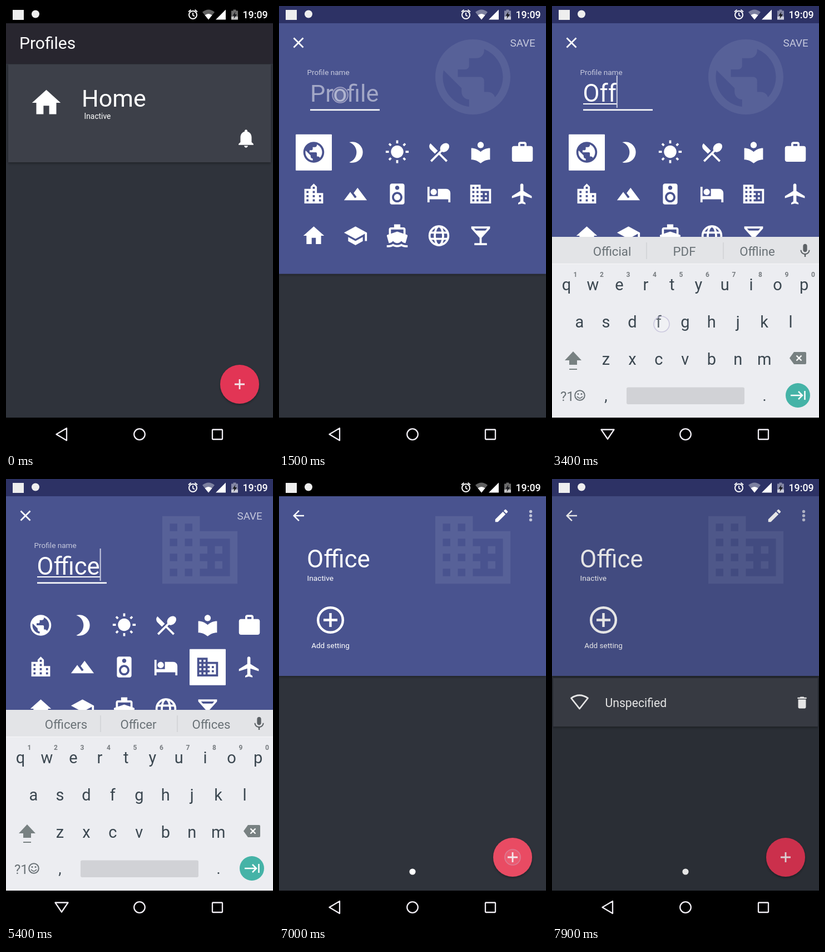
An HTML page that plays this animation: 480 by 800 pixels, repeating every 8000 ms.

```html
<!DOCTYPE html>
<html lang="en">
<head>
<meta charset="utf-8">
<title>Profiles</title>
<style>
html, body { margin: 0; width: 100%; height: 100%; overflow: hidden; background: #000; }
svg { display: block; width: 480px; height: 800px; font-family: Roboto, "Noto Sans", sans-serif; }
</style>
</head>
<body>
<svg id="stage" viewBox="0 0 480 800"></svg>
<script>
const LOOP = 8000, STEP = 100;
const BLUE = '#4a538f', BODY = '#2f333b', INK = '#3b4750', GREY = '#697176';

// Icon outlines on a 24-unit grid
const ICONS = {
  earth: 'M12 2C6.48 2 2 6.48 2 12s4.48 10 10 10 10-4.48 10-10S17.52 2 12 2zm-1 17.93c-3.95-.49-7-3.85-7-7.93 0-.62.08-1.21.21-1.79L9 15v1c0 1.1.9 2 2 2v1.93zm6.9-2.54c-.26-.81-1-1.39-1.9-1.39h-1v-3c0-.55-.45-1-1-1H8v-2h2c.55 0 1-.45 1-1V7h2c1.1 0 2-.9 2-2v-.41c2.93 1.19 5 4.06 5 7.41 0 2.08-.8 3.97-2.1 5.39z',
  moon: 'M9 2c-1.05 0-2.05.16-3 .46 4.06 1.27 7 5.06 7 9.54 0 4.48-2.94 8.27-7 9.54.95.3 1.95.46 3 .46 5.52 0 10-4.48 10-10S14.52 2 9 2z',
  sun: 'M6.76 4.84l-1.8-1.79-1.41 1.41 1.79 1.79 1.42-1.41zM4 10.5H1v2h3v-2zm9-9.95h-2V3.5h2V.55zm7.45 3.91l-1.41-1.41-1.79 1.79 1.41 1.41 1.79-1.79zm-3.21 13.7l1.79 1.8 1.41-1.41-1.8-1.79-1.4 1.4zM20 10.5v2h3v-2h-3zm-8-5c-3.31 0-6 2.69-6 6s2.69 6 6 6 6-2.69 6-6-2.69-6-6-6zm-1 16.95h2V19.5h-2v2.95zm-7.45-3.91l1.41 1.41 1.79-1.8-1.41-1.41-1.79 1.8z',
  food: 'M8.1 13.34l2.83-2.83L3.91 3.5c-1.56 1.56-1.56 4.09 0 5.66l4.19 4.18zm6.78-1.81c1.53.71 3.68.21 5.27-1.38 1.91-1.91 2.28-4.65.81-6.12-1.46-1.46-4.2-1.1-6.12.81-1.59 1.59-2.09 3.74-1.38 5.27L3.7 19.87l1.41 1.41L12 14.41l6.88 6.88 1.41-1.41L13.41 13l1.47-1.47z',
  book: 'M12 11.55C9.64 9.35 6.48 8 3 8v11c3.48 0 6.64 1.35 9 3.55 2.36-2.19 5.52-3.55 9-3.55V8c-3.48 0-6.64 1.35-9 3.55zM12 8c1.66 0 3-1.34 3-3s-1.34-3-3-3-3 1.34-3 3 1.34 3 3 3z',
  bag: 'M20 6h-4V4c0-1.11-.89-2-2-2h-4c-1.11 0-2 .89-2 2v2H4c-1.11 0-1.99.89-1.99 2L2 19c0 1.11.89 2 2 2h16c1.11 0 2-.89 2-2V8c0-1.11-.89-2-2-2zm-6 0h-4V4h4v2z',
  city: 'M15 11V5l-3-3-3 3v2H3v14h18V11h-6zm-8 8H5v-2h2v2zm0-4H5v-2h2v2zm0-4H5V9h2v2zm6 8h-2v-2h2v2zm0-4h-2v-2h2v2zm0-4h-2V9h2v2zm0-4h-2V5h2v2zm6 12h-2v-2h2v2zm0-4h-2v-2h2v2z',
  hills: 'M14 6l-3.75 5 2.85 3.8-1.6 1.2C9.81 13.75 7 10 7 10l-6 8h22L14 6z',
  speaker: 'M17 2H7c-1.1 0-2 .9-2 2v16c0 1.1.9 2 2 2h10c1.1 0 2-.9 2-2V4c0-1.1-.9-2-2-2zm-5 2c1.1 0 2 .9 2 2s-.9 2-2 2-2-.9-2-2 .9-2 2-2zm0 16c-2.76 0-5-2.24-5-5s2.24-5 5-5 5 2.24 5 5-2.24 5-5 5zm0-8c-1.66 0-3 1.34-3 3s1.34 3 3 3 3-1.34 3-3-1.34-3-3-3z',
  bed: 'M7 13c1.66 0 3-1.34 3-3S8.66 7 7 7s-3 1.34-3 3 1.34 3 3 3zm12-6h-8v7H3V5H1v15h2v-3h18v3h2v-9c0-2.21-1.79-4-4-4z',
  office: 'M12 7V3H2v18h20V7H12zM6 19H4v-2h2v2zm0-4H4v-2h2v2zm0-4H4V9h2v2zm0-4H4V5h2v2zm4 12H8v-2h2v2zm0-4H8v-2h2v2zm0-4H8V9h2v2zm0-4H8V5h2v2zm10 12h-8v-2h2v-2h-2v-2h2v-2h-2V9h8v10zm-2-8h-2v2h2v-2zm0 4h-2v2h2v-2z',
  plane: 'M21 16v-2l-8-5V3.5c0-.83-.67-1.5-1.5-1.5S10 2.67 10 3.5V9l-8 5v2l8-2.5V19l-2 1.5V22l3.5-1 3.5 1v-1.5L13 19v-5.5l8 2.5z',
  home: 'M10 20v-6h4v6h5v-8h3L12 3 2 12h3v8z',
  school: 'M5 13.18v4L12 21l7-3.82v-4L12 17l-7-3.82zM12 3L1 9l11 6 9-4.91V17h2V9L12 3z',
  boat: 'M20 21c-1.39 0-2.78-.47-4-1.32-2.44 1.71-5.56 1.71-8 0C6.78 20.53 5.39 21 4 21H2v2h2c1.38 0 2.74-.35 4-1 2.52 1.3 5.48 1.3 8 0 1.26.65 2.62 1 4 1h2v-2h-2zM4 19c1.6 0 3-.88 4-2 1 1.12 2.4 2 4 2s3-.88 4-2c1 1.12 2.4 2 4 2l1.9-6.7c.2-.6-.1-1.1-.6-1.3L20 10.6V6c0-1.1-.9-2-2-2h-3V1H9v3H6c-1.1 0-2 .9-2 2v4.6l-1.3.4c-.5.2-.8.7-.6 1.3L4 19zM6 6h12v4L12 8 6 10V6z',
  globe: '',
  bar: 'M21 5V3H3v2l8 9v5H6v2h12v-2h-5v-5l8-9zM7.43 7L5.66 5h12.69l-1.78 2H7.43z',
  bell: 'M12 22c1.1 0 2-.9 2-2h-4c0 1.1.89 2 2 2zm6-6v-5c0-3.07-1.64-5.64-4.5-6.32V4c0-.83-.67-1.5-1.5-1.5s-1.5.67-1.5 1.5v.68C7.63 5.36 6 7.92 6 11v5l-2 2v1h16v-1l-2-2z',
  back: 'M20 11H7.83l5.59-5.59L12 4l-8 8 8 8 1.41-1.41L7.83 13H20v-2z',
  pencil: 'M3 17.25V21h3.75L17.81 9.94l-3.75-3.75L3 17.25zM20.71 7.04c.39-.39.39-1.02 0-1.41l-2.34-2.34c-.39-.39-1.02-.39-1.41 0l-1.83 1.83 3.75 3.75 1.83-1.83z',
  bin: 'M6 19c0 1.1.9 2 2 2h8c1.1 0 2-.9 2-2V7H6v12zM19 4h-3.5l-1-1h-5l-1 1H5v2h14V4z',
  mic: 'M12 14c1.66 0 3-1.34 3-3V5c0-1.66-1.34-3-3-3S9 3.34 9 5v6c0 1.66 1.34 3 3 3zm5.3-3c0 3-2.54 5.1-5.3 5.1S6.7 14 6.7 11H5c0 3.41 2.72 6.23 6 6.72V21h2v-3.28c3.28-.48 6-3.3 6-6.72h-1.7z'
};
const GRID = Object.keys(ICONS).slice(0, 17);

const icon = (name, x, y, scale, fill = '#fff', extra = '') => {
  const shape = name === 'globe'
    ? `<g fill="none" stroke="${fill}" stroke-width="2"><circle cx="12" cy="12" r="9"/><ellipse cx="12" cy="12" rx="4" ry="9"/><path d="M4 9h16M4 15h16"/></g>`
    : `<path d="${ICONS[name]}" fill="${fill}"/>`;
  return `<g transform="translate(${x} ${y}) scale(${scale}) translate(-12 -12)" ${extra}>${shape}</g>`;
};
const rect = (x, y, w, h, fill, extra = '') =>
  `<rect x="${x}" y="${y}" width="${w}" height="${h}" fill="${fill}" ${extra}/>`;
const circle = (x, y, r, fill, extra = '') => `<circle cx="${x}" cy="${y}" r="${r}" fill="${fill}" ${extra}/>`;
const text = (x, y, size, str, fill = '#fff', extra = '') =>
  `<text x="${x}" y="${y}" font-size="${size}" fill="${fill}" ${extra}>${str}</text>`;
const line = (d, stroke, width, extra = '') =>
  `<path d="${d}" fill="none" stroke="${stroke}" stroke-width="${width}" ${extra}/>`;
const middle = 'text-anchor="middle"';
const shadow = 'filter="url(#shadow)"';

const fab = id => circle(420, 680, 35, '#e23655', `id="${id}" ${shadow}`) +
  line('M411 680h18M420 671v18', '#f3e6ea', 2.8);
const wifiFan = (x, y, stroke) => line(`M${x - 15} ${y - 8}q15 -10.5 30 0l-15 19z`, stroke, 2.8, 'stroke-linejoin="round"');

const listScreen = rect(0, 31, 480, 709, BODY) + rect(0, 31, 480, 73, '#28262f') +
  text(24, 77, 30, 'Profiles') + rect(4, 105, 472, 176, '#3c404a', shadow) +
  icon('home', 72.5, 174, 2.57) + text(136, 181, 43, 'Home') + text(140.5, 203, 13.8, 'Inactive') +
  icon('bell', 431.5, 238, 1.67) + fab('listFab');

const cell = i => [62.5 + 75 * (i % 6), 263 + 75 * Math.floor(i / 6)];
const editorScreen = rect(0, 31, 480, 709, BODY) + rect(0, 31, 480, 450.5, BLUE, shadow) +
  line('M26.5 57.5l17 17M43.5 57.5l-17 17', '#fff', 2.8) + text(415.5, 73, 18.8, 'SAVE', '#c6c9dd') +
  icon('earth', 348.5, 127.5, 6.75, '#fff', 'id="bigEarth" opacity=".08"') +
  icon('office', 348.5, 127.5, 6.75, '#fff', 'id="bigOffice" opacity=".08"') +
  text(50.5, 124, 13.6, 'Profile name', '#c6c9dd') + text(56, 172, 43.2, 'Profile', '#a3a8c7', 'id="hint"') +
  text(55.5, 172, 43.6, '', '#fff', 'id="typed"') +
  rect(56, 185.5, 125, 2.6, '#fff') + rect(56, 175, 0, 2, '#fff', 'id="composing"') +
  rect(56, 125, 2, 58, '#c9cce0', 'id="caret"') +
  rect(0, 0, 65, 65, '#fff', 'id="picked" rx="1"') +
  GRID.map((name, i) => `<g id="cell${i}">${icon(name, ...cell(i), 1.875, 'currentColor')}</g>`).join('');

const keyRow = (letters, x, y) => [...letters].map((c, i) =>
  text(x + 47.45 * i, y, 29, c, INK, `${middle} class="key"`)).join('');
const keyboard = rect(0, 415, 480, 325, '#ecedf1') + rect(0, 415, 480, 48, '#e3e4e7') +
  line('M0 463.5h480', '#f6f6f8', 1) + line('M170 425v30M308 425v30', '#c6c8cb', 1) +
  [108, 238, 369].map((x, i) => text(x, 448.5, 22.2, '', GREY, `${middle} id="word${i}"`)).join('') +
  icon('mic', 455, 440, 1.22, '#5d6266') +
  keyRow('qwertyuiop', 26, 511) + keyRow('asdfghjkl', 49.5, 578) + keyRow('zxcvbnm', 97, 645) +
  [...'1234567890'].map((n, i) => text(42 + 47.5 * i, 486.5, 12, n, '#777c80', `${middle} font-weight="700"`)).join('') +
  '<path d="M38 621l15 16h-8v8h-14v-8h-8z" fill="#788182"/>' + line('M31 653h14', '#788182', 2) +
  '<path d="M427 633l8-11h20q2 0 2 2v18q0 2-2 2h-20z" fill="#788182"/>' + line('M439.500 628.500l9 9M448.500 628.500l-9 9', '#fff', 2.4) +
  text(15, 710, 24, '?1', GREY) + circle(50, 700, 8.8, 'none', `stroke="${GREY}" stroke-width="2"`) +
  circle(47, 697.500, 1.5, GREY) + circle(53, 697.500, 1.5, GREY) + line('M45 702q5 6 10 0', GREY, 1.8) +
  text(97, 710, 27, ',', INK, middle) + text(382, 710, 27, '.', INK, middle) +
  rect(134, 685.5, 212, 30.5, '#d1d2d6', 'rx="3"') + circle(442, 700, 22, '#45b3a7') +
  line('M429 700h20M443 693l7 7-7 7M454.500 692v16', '#fff', 2.5);

const detailScreen = rect(0, 31, 480, 709, BODY) + rect(0, 31, 480, 323, BLUE, shadow) +
  icon('back', 35, 66, 1.25) + icon('pencil', 400, 66, 1.25) +
  [58.5, 66, 73.5].map(y => circle(452.5, y, 2.7, '#c0c3d8')).join('') +
  icon('office', 348.5, 127.5, 6.75, '#fff', 'opacity=".08"') +
  text(50, 159, 43.8, 'Office') + text(50.5, 183, 13.7, 'Inactive') +
  circle(92.5, 253.5, 22.3, 'none', 'stroke="#fff" stroke-width="4.4"') +
  line('M80 253.500h25M92.500 241v25', '#fff', 4.4) + text(92.5, 304, 13.5, 'Add setting', '#fff', middle) +
  `<g id="condition">${rect(2, 358, 476, 87, '#3c4049', shadow)}${wifiFan(49.5, 402, '#fff')}` +
  text(95.5, 410, 21.2, 'Unspecified') + icon('bin', 449.5, 402, 1.16) + '</g>' +
  circle(240, 706, 5.6, '#fff') + fab('detailFab');

const sheet = rect(0, 496, 480, 244, '#fff') + text(22.5, 541, 21, 'Add condition', '#3d3d42') +
  circle(46, 606, 13.6, 'none', 'stroke="#3b3b42" stroke-width="2.8"') + line('M46 598v9l6 4', '#3b3b42', 2.4) +
  text(103.5, 614.5, 22.5, 'Time / day of week', '#3d3d42') +
  wifiFan(46.5, 681, '#3b3b42') + text(103, 690, 22.5, 'Connecting to Wi-Fi', '#3d3d42');

const statusBar = rect(0, 0, 480, 31, '#000') + rect(0, 0, 480, 31, '#2d3265', 'id="statusTint"') +
  rect(12, 7, 20, 18, '#eee') + circle(53, 14.5, 7, '#eee') +
  circle(336, 16, 7, 'none', 'stroke="#fff" stroke-width="2"') +
  line('M336 12v4.500l3 2M328 10.500l4.500-3.700M344 10.500l-4.500-3.700', '#fff', 1.8) +
  '<path d="M353 11q11-9 22 0l-11 13.500z" fill="#fff" opacity=".38"/><path d="M357.500 16.500q6.500-5 13 0l-6.500 8z" fill="#fff"/>' +
  '<path d="M377 24.500h18V6.500z" fill="#fff"/>' +
  '<path d="M405 8.500h3.500V6.500h5v2h3.500v16h-12z" fill="#fff" opacity=".42"/><path d="M405 19h12v5.500h-12z" fill="#fff" opacity=".6"/><path d="M412.500 10l-5 7.500h3l-1 5.500 5.500-8h-3.500z" fill="#16171c"/>' +
  text(425.5, 22, 17.8, '19:09', '#fff', 'font-weight="500"');

const navBar = rect(0, 740, 480, 60, '#000') +
  line('', '#f1eef4', 2.3, 'id="backKey" stroke-linejoin="round"') +
  circle(240, 770, 9.8, 'none', 'stroke="#f1eef4" stroke-width="2.3"') +
  rect(371, 761.5, 18, 17.5, 'none', 'stroke="#f1eef4" stroke-width="2.3" rx="1"');

const group = (id, body) => `<g id="${id}">${body}</g>`;
const stage = document.getElementById('stage');
stage.innerHTML = '<defs><filter id="shadow" x="-20%" y="-20%" width="140%" height="150%">' +
  '<feDropShadow dx="0" dy="2" stdDeviation="2" flood-opacity=".35"/></filter></defs>' +
  group('list', listScreen) + group('editor', editorScreen) + group('detail', detailScreen) +
  group('keyboard', keyboard) + rect(0, 31, 480, 709, '#000', 'id="dim"') + group('sheet', sheet) +
  statusBar + navBar + circle(0, 0, 14, '#fff', 'id="touch" fill-opacity=".22" stroke="#c8c4dc" stroke-width="1.6"');

const $ = id => document.getElementById(id);
const set = (id, attrs) => { for (const k in attrs) $(id).setAttribute(k, attrs[k]); };
const show = (id, on) => set(id, { display: on ? 'inline' : 'none' });
const clamp = v => Math.max(0, Math.min(1, v));
const ramp = (t, from, to) => clamp((t - from) / (to - from));
const easeOut = v => 1 - (1 - v) ** 2.5;

// Time, text and the suggestions that follow it
const TYPING = [
  [0, '', '', '', ''],
  [2600, 'O', 'Of', 'On', 'Our'],
  [3200, 'Of', 'Of', 'Off', 'Offer'],
  [3400, 'Off', 'Official', 'PDF', 'Offline'],
  [3700, 'Offi', 'Official', 'Office', 'Officer'],
  [4100, 'Offic', 'Officer', 'Office', 'Official'],
  [4400, 'Office', 'Officers', 'Officer', 'Offices']
];
// Time, position of each tap
const TAPS = [
  [500, 420, 680], [1500, 110, 160], [2500, 405, 502], [3100, 192, 570], [3300, 197, 572],
  [3600, 358, 502], [4000, 192, 635], [4300, 121, 502], [4900, 362, 338],
  [5600, 438, 66], [6800, 420, 680], [7600, 250, 700]
];
const keys = [...document.querySelectorAll('.key')];
const letters = keys.map(k => k.textContent);

function enter(id, t, from, to) {
  const p = easeOut(ramp(t, from, to));
  show(id, p > 0);
  set(id, { opacity: p, transform: `translate(0 ${64 * (1 - p)})` });
  return p;
}

function draw(t) {
  const editorIn = enter('editor', t, 800, 1200);
  enter('detail', t, 5900, 6300);
  show('list', editorIn < 1);

  const [since, typed, ...words] = TYPING.filter(s => s[0] <= t).pop();
  $('typed').textContent = typed;
  words.forEach((w, i) => $('word' + i).textContent = w);
  show('hint', !typed);
  const width = typed ? $('typed').getComputedTextLength() : 0;
  set('composing', { width });
  set('caret', { x: 55.5 + width });
  const blinkStart = since || (t < 1600 ? 1000 : 1600);
  show('caret', t >= 1000 && Math.floor((t - blinkStart) / 500) % 2 === 0);
  keys.forEach((k, i) => k.textContent = typed ? letters[i] : letters[i].toUpperCase());

  const choice = t < 5000 ? 0 : GRID.indexOf('office');
  const [cx, cy] = cell(choice);
  set('picked', { x: cx - 32.5, y: cy - 32.3 });
  GRID.forEach((_, i) => set('cell' + i, { color: i === choice ? BLUE : '#fff' }));
  show('bigEarth', choice === 0);
  show('bigOffice', choice !== 0);

  const up = easeOut(ramp(t, 1600, 2000)) * (1 - ramp(t, 5700, 6000));
  show('keyboard', up > 0);
  set('keyboard', { opacity: up, transform: `translate(0 ${325 * (1 - up)})` });
  set('backKey', { d: up > 0.5 ? 'M88.500 761.500h23l-11.500 17z' : 'M90.500 770l18.500-11v22z' });

  const dim = 0.6 * easeOut(ramp(t, 7000, 7400)) * (1 - ramp(t, 7720, 7936));
  set('dim', { opacity: dim });
  const sheetUp = easeOut(ramp(t, 7000, 7400)) * (1 - ramp(t, 7700, 7900));
  show('sheet', sheetUp > 0);
  set('sheet', { transform: `translate(0 ${244 * (1 - sheetUp)})` });
  show('condition', t >= 7800);
  set('statusTint', { opacity: t >= 6900 && t < 7800 ? 0 : editorIn });

  set('listFab', { fill: t >= 600 && t < 900 ? '#e94c64' : '#e23655' });
  set('detailFab', { fill: t >= 6900 && t < 7200 ? '#e94c64' : '#e23655' });

  const tap = TAPS.find(([start]) => t >= start && t < start + 300 &&
    !TAPS.some(([next]) => next > start && next <= t));
  show('touch', !!tap);
  if (tap) set('touch', { cx: tap[1], cy: tap[2], opacity: [0.7, 0.9, 0.4][Math.floor((t - tap[0]) / 100)] });
}

const origin = performance.now();
function tick() {
  const t = (performance.now() - origin) % LOOP;
  draw(Math.floor(t / STEP) * STEP);
  requestAnimationFrame(tick);
}
tick();
</script>
</body>
</html>
```
